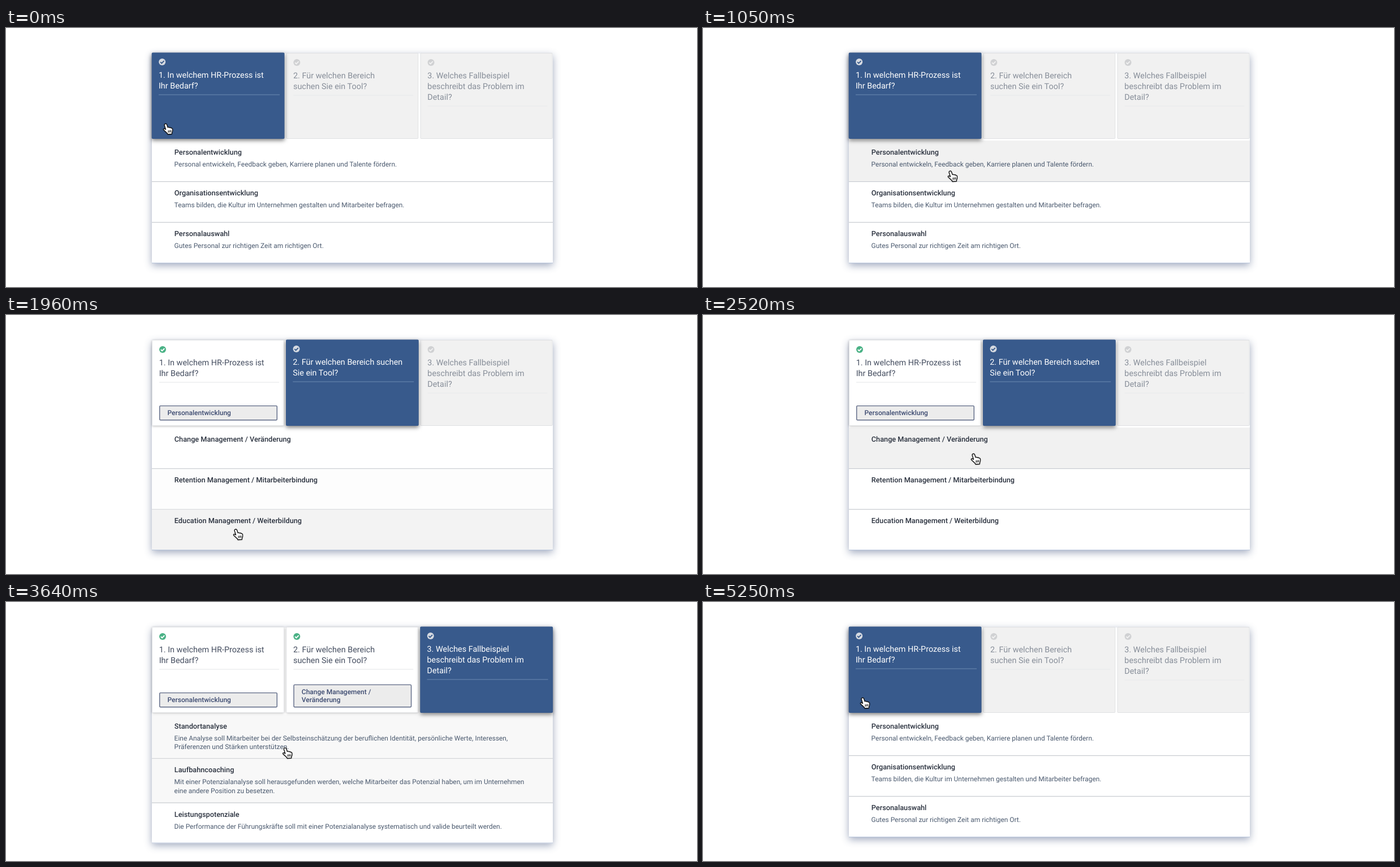
Write an HTML page with a canvas that moves like this. It is 1222 px wide and 458 px high and loops after 5.32 s.

```html
<!DOCTYPE html>
<html lang="de">
<head>
<meta charset="utf-8">
<title>Tool-Suche</title>
<style>
html, body { margin: 0; width: 100%; height: 100%; overflow: hidden; background: #fff; }
canvas { display: block; }
</style>
</head>
<body>
<canvas id="stage" width="1222" height="458"></canvas>
<script>
const ctx = document.getElementById('stage').getContext('2d');
const LOOP = 5320, STEP = 70;
const LEFT = 258, WIDTH = 709, ROWS_TOP = 199;
const BLUE = '#385a8c', GREEN = '#4bb286';

const cards = [
  { x: 258, lines: ['1. In welchem HR-Prozess ist', 'Ihr Bedarf?'], chip: ['Personalentwicklung'] },
  { x: 495.3, lines: ['2. Für welchen Bereich', 'suchen Sie ein Tool?'],
    activeLines: ['2. Für welchen Bereich suchen', 'Sie ein Tool?'], chip: ['Change Management /', 'Veränderung'] },
  { x: 732.6, lines: ['3. Welches Fallbeispiel', 'beschreibt das Problem im', 'Detail?'], chip: ['Standortanalyse'] }
];

// Each step lists its row bottoms and the rows: a title followed by its description lines.
const steps = [
  { ends: [271.5, 343.5, 416], rows: [
    ['Personalentwicklung', 'Personal entwickeln, Feedback geben, Karriere planen und Talente fördern.'],
    ['Organisationsentwicklung', 'Teams bilden, die Kultur im Unternehmen gestalten und Mitarbeiter befragen.'],
    ['Personalauswahl', 'Gutes Personal zur richtigen Zeit am richtigen Ort.']] },
  { ends: [271.5, 343.5, 416], rows: [
    ['Change Management / Veränderung'],
    ['Retention Management / Mitarbeiterbindung'],
    ['Education Management / Weiterbildung']] },
  { ends: [276.5, 355, 426.5], rows: [
    ['Standortanalyse', 'Eine Analyse soll Mitarbeiter bei der Selbsteinschätzung der beruflichen Identität, persönliche Werte, Interessen,', 'Präferenzen und Stärken unterstützen.'],
    ['Laufbahncoaching', 'Mit einer Potenzialanalyse soll herausgefunden werden, welche Mitarbeiter das Potenzial haben, um im Unternehmen', 'eine andere Position zu besetzen.'],
    ['Leistungspotenziale', 'Die Performance der Führungskräfte soll mit einer Potenzialanalyse systematisch und valide beurteilt werden.']] },
  { ends: [424], rows: [] }
];

// Pointer stops: time, x, y
const stops = [
  [0, 281.5, 169], [350, 281.5, 169], [980, 436.5, 252.5], [1540, 436.5, 252.5],
  [1960, 405.5, 378.5], [2030, 405.5, 378.5], [2450, 477.5, 245], [2660, 477.5, 245],
  [3150, 591, 322.5], [3290, 591, 322.5], [3780, 468.5, 241.5], [4340, 468.5, 241.5],
  [4830, 281.5, 169], [LOOP, 281.5, 169]
];
const clicks = [1260, 2660, 3850, 4970];

const stepAt = t => clicks.filter(c => t >= c).length % 4;

function pointerAt(t) {
  const i = stops.findIndex(s => s[0] > t);
  const [t0, x0, y0] = stops[i - 1], [t1, x1, y1] = stops[i];
  const p = (t - t0) / (t1 - t0), k = p * p * (3 - 2 * p);
  return { x: x0 + (x1 - x0) * k, y: y0 + (y1 - y0) * k };
}

function hoveredRow(t) {
  const { y } = pointerAt(t);
  return y < ROWS_TOP ? -1 : steps[stepAt(t)].ends.findIndex(end => y < end);
}

// Averaging the recent hover state gives a linear fade.
function hoverAmount(row, t) {
  const samples = 12, fade = 180;
  let hits = 0;
  for (let i = 0; i < samples; i++) {
    const past = Math.max(0, t - i * fade / samples);
    if (stepAt(past) === stepAt(t) && hoveredRow(past) === row) hits++;
  }
  return hits / samples;
}

function text(str, x, y, size, color, weight = 400, align = 'left') {
  ctx.font = `${weight} ${size}px Roboto, sans-serif`;
  ctx.textAlign = align;
  ctx.fillStyle = color;
  ctx.fillText(str, x, y);
}

function box(x, y, w, h, r, fill, border, lineWidth = 1) {
  ctx.beginPath();
  ctx.roundRect(x, y, w, h, r);
  ctx.fillStyle = fill;
  ctx.fill();
  if (border) {
    ctx.shadowColor = 'transparent';
    ctx.strokeStyle = border;
    ctx.lineWidth = lineWidth;
    ctx.stroke();
  }
}

function shadowed(color, blur, offset, draw) {
  ctx.save();
  ctx.shadowColor = color;
  ctx.shadowBlur = blur;
  ctx.shadowOffsetY = offset;
  draw();
  ctx.restore();
}

function drawCheck(x, y, fill, mark) {
  box(x - 6, y - 6, 12, 12, 6, fill);
  ctx.strokeStyle = mark;
  ctx.lineWidth = 1.9;
  ctx.stroke(new Path2D(`M${x - 3.2} ${y + .1}l2.3 2.3l4.2 -4.2`));
}

function drawChip(x, lines) {
  const top = lines.length > 1 ? 146.4 : 160.6;
  box(x + 13.7, top, 207.6, 185.7 - top, 1.5, '#ececec', '#5d6885', 1.4);
  lines.forEach((line, i) =>
    text(line, x + 27.5, 177 - (lines.length - 1 - i) * 14.4, 12, '#3c4a70', 500));
}

function drawCard(card, state) {
  const { x } = card, active = state === 'active', done = state === 'done';
  const shift = active ? 0 : 1;
  const look = {
    active: { fill: BLUE, ink: '#fff', rule: '#6c89b4', check: '#d6dae1', mark: BLUE },
    done: { fill: '#fff', ink: '#454e60', rule: '#e3e5e8', check: GREEN, mark: '#fff' },
    waiting: { fill: '#f1f1f1', ink: '#878e99', rule: '#e8e9eb', check: '#d0d1d3', mark: '#f1f1f1' }
  }[state];

  if (active) {
    shadowed('rgba(0,0,0,.5)', 7, 3, () => box(x - .3, 43.5, 234.8, 152.5, 2, look.fill));
  } else {
    shadowed(done ? 'rgba(0,0,0,.3)' : 'transparent', 4, 1,
      () => box(x + .5, 44.5, 233, 151, 1, look.fill, done ? '#e4e5e8' : '#dfe0e2'));
  }

  drawCheck(x + 18.2 + shift * .8, 60 + shift, look.check, look.mark);
  const lines = active && card.activeLines || card.lines;
  lines.forEach((line, i) => text(line, x + 11.9 + shift * .8, 87.6 + shift + i * 19, 14.4, look.ink));
  ctx.fillStyle = look.rule;
  ctx.fillRect(x + 12 + shift, 79.5 + shift + lines.length * 19, 214 - shift * 2, 1);
  if (done) drawChip(x, card.chip);
}

function drawRows(step, t) {
  let top = ROWS_TOP;
  step.rows.forEach(([title, ...details], i) => {
    const end = step.ends[i];
    ctx.fillStyle = `rgba(241,241,241,${hoverAmount(i, t)})`;
    ctx.fillRect(LEFT, top, WIDTH, end - top);
    if (i < 2) {
      ctx.fillStyle = '#c8cbd0';
      ctx.fillRect(LEFT, end - .5, WIDTH, 1.2);
    }
    const base = top + 24.8;
    text(title, 297.8, base, 12.72, '#2a313e', 500);
    details.forEach((line, j) => text(line, 297.6, base + 20.8 + j * 15.7, 11.94, '#4a596e'));
    top = end;
  });
}

function drawResult() {
  text('64 Tools gefunden', 612.5, 273.5, 24, '#454f66', 400, 'center');
  box(436, 304.5, 353, 40.5, 2, GREEN);
  text('Alle ansehen', 612.5, 328.5, 13, '#fff', 400, 'center');
}

const hand = new Path2D('M4.2 1C5.6 .4 6.6 1.3 7 2.5L8.6 7.3C9.8 6.5 11 6.8 11.6 7.8C12.8 7 14 7.5 14.4 8.6C15.6 8.1 16.8 8.9 17 10.2C17.4 13 16.8 15 16 16.5L15.8 19L8.5 19.5L7.8 17.8C5.8 16 4 14 1.3 11.8C.2 10.7 1.2 9.3 2.6 9.6L5 11L2.7 3.6C2.3 2.3 3 1.3 4.2 1Z');
const knuckles = new Path2D('M9.6 12.5v4M11.8 12.3v4M14 12.1v4');
const arrow = new Path2D('M0 0V16L3.7 12.6L6.2 18.8L8.8 17.7L6.2 11.6H11.3Z');

function drawPointer(step, { x, y }) {
  const overChip = y > 160 && y < 187 && x > 271 && x < 480;
  ctx.save();
  ctx.lineJoin = 'round';
  if (step < 3 || overChip) {
    ctx.translate(x - 4, y - .5);
    shadowed('rgba(0,0,0,.35)', 2, 1, () => { ctx.fillStyle = '#fff'; ctx.fill(hand); });
    ctx.strokeStyle = '#111';
    ctx.lineWidth = 1.4;
    ctx.stroke(hand);
    ctx.lineWidth = 1.1;
    ctx.stroke(knuckles);
  } else {
    ctx.translate(x, y);
    ctx.strokeStyle = '#fff';
    ctx.lineWidth = 2;
    shadowed('rgba(0,0,0,.4)', 3, 1, () => ctx.stroke(arrow));
    ctx.fillStyle = '#000';
    ctx.fill(arrow);
  }
  ctx.restore();
}

function draw(t) {
  const index = stepAt(t), step = steps[index];
  const bottom = step.ends[step.ends.length - 1];
  ctx.fillStyle = '#fff';
  ctx.fillRect(0, 0, 1222, 458);
  shadowed('rgba(45,65,110,.45)', 14, 4, () => box(LEFT, 45, WIDTH, bottom - 45, 1, '#fff'));
  drawRows(step, t);
  if (index === 3) drawResult();
  ctx.fillStyle = '#b9c6dc';
  ctx.fillRect(LEFT, bottom - 1, WIDTH, 1);

  const stateOf = i => i < index ? 'done' : 'waiting';
  cards.forEach((card, i) => { if (i !== index) drawCard(card, stateOf(i)); });
  if (index < 3) drawCard(cards[index], 'active');
  drawPointer(index, pointerAt(t));
}

ctx.textRendering = 'geometricPrecision';
const start = performance.now();
function tick() {
  const t = (performance.now() - start) % LOOP;
  draw(Math.floor(t / STEP) * STEP);
  requestAnimationFrame(tick);
}
tick();
</script>
</body>
</html>
```
